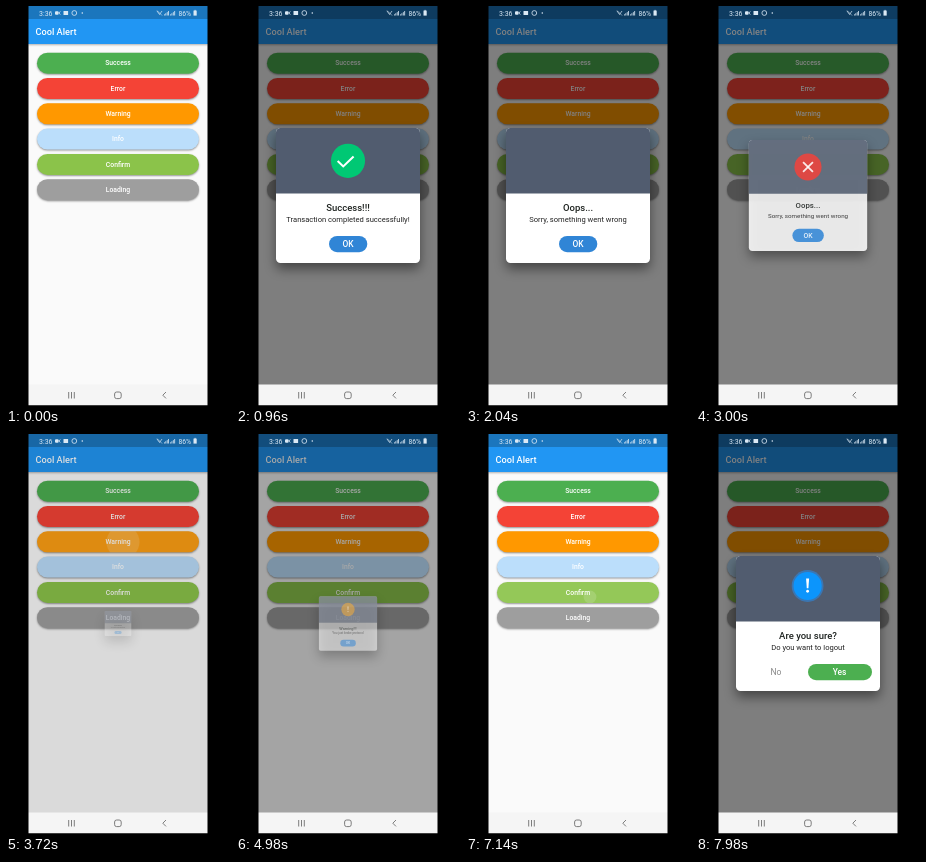
An HTML page with a canvas that plays this animation: 224x400 px, repeating every 8 s.

```html
<!DOCTYPE html>
<html lang="en">
<head>
<meta charset="utf-8">
<title>Cool Alert</title>
<style>
html, body { margin: 0; width: 100%; height: 100%; overflow: hidden; background: #000; }
canvas { display: block; width: 224px; height: 400px; }
</style>
</head>
<body>
<canvas id="stage"></canvas>
<script>
const W = 224, H = 400, LOOP = 8000, MOVE = 146;
const canvas = document.getElementById('stage');
const c = canvas.getContext('2d');
const dpr = Math.max(1, window.devicePixelRatio || 1);
canvas.width = W * dpr;
canvas.height = H * dpr;

const FONT = 'Roboto, Arial, sans-serif';
const buttons = [
  ['Success', '#4caf50'], ['Error', '#f44336'], ['Warning', '#ff9800'],
  ['Info', '#bbdefb'], ['Confirm', '#8bc34a'], ['Loading', '#9e9e9e']
];
const alerts = [
  { button: 0, tap: 55, open: 95, icon: 400, close: 1115, x: 118, y: 60,
    title: 'Success!!!', text: 'Transaction completed successfully!', color: '#00c874', mark: 'check' },
  { button: 1, tap: 1555, open: 1595, icon: 2045, close: 2975, x: 118, y: 85,
    title: 'Oops...', text: 'Sorry, something went wrong', color: '#f0433c', mark: 'cross' },
  { button: 2, tap: 3664, open: 3694, icon: 4010, close: 4894, x: 117, y: 108,
    title: 'Warning!!!', text: 'You just broke protocol', color: '#fbb034', mark: 'bang' },
  { button: 3, tap: 5455, open: 5495, icon: 5850, close: 6695, x: 120, y: 136,
    title: 'Info!', text: 'Buy two, get one free', color: '#0c95fc', mark: 'bang', glow: true },
  { button: 4, tap: 7130, open: 7180, icon: 7520, close: 9000, x: 124, y: 163,
    title: 'Are you sure?', text: 'Do you want to logout', color: '#0c95fc', mark: 'bang', glow: true, ask: true }
];

const clamp = v => Math.max(0, Math.min(1, v));
const part = (t, from, length) => clamp((t - from) / length);
const outBack = v => 1 + 2.4 * (v - 1) ** 3 + 1.4 * (v - 1) ** 2;

// cubic-bezier(.25, .1, .25, 1)
function ease(x) {
  let lo = 0, hi = 1, s = x;
  for (let i = 0; i < 16; i++) {
    s = (lo + hi) / 2;
    const bx = .75 * s * (1 - s) + s ** 3;
    if (bx < x) lo = s; else hi = s;
  }
  return .3 * s * (1 - s) ** 2 + 3 * s * s * (1 - s) + s ** 3;
}

function rect(x, y, w, h, color) {
  c.fillStyle = color;
  c.fillRect(x, y, w, h);
}

function roundPath(x, y, w, h, r) {
  c.beginPath();
  c.roundRect(x, y, w, h, r);
}

function pill(x, y, w, h, color) {
  roundPath(x, y, w, h, h / 2);
  c.fillStyle = color;
  c.fill();
}

function disc(x, y, r, color) {
  c.beginPath();
  c.arc(x, y, r, 0, Math.PI * 2);
  c.fillStyle = color;
  c.fill();
}

function line(points, width, color) {
  c.beginPath();
  points.forEach(([x, y], i) => i ? c.lineTo(x, y) : c.moveTo(x, y));
  c.strokeStyle = color;
  c.lineWidth = width;
  c.stroke();
}

function label(str, x, y, size, weight, color, align = 'center') {
  c.font = `${weight} ${size}px ${FONT}`;
  c.textAlign = align;
  c.fillStyle = color;
  c.fillText(str, x, y);
}

function shadow(color, blur, dy) {
  c.shadowColor = color;
  c.shadowBlur = blur * dpr;
  c.shadowOffsetY = dy * dpr;
}

const black = a => `rgba(0,0,0,${a})`;

function statusIcons() {
  const ink = '#dbe9f5';
  label('3:36', 33, 9.6, 7, 400, ink, 'left');
  roundPath(49, 5.2, 3.6, 3.6, 1);
  c.fillStyle = ink;
  c.fill();
  line([[54.3, 5.4], [53, 7], [54.3, 8.6]], .8, ink);
  rect(57.5, 5, 4.6, 4, ink);
  c.beginPath();
  c.arc(68.3, 7, 2.4, 0, Math.PI * 2);
  c.lineWidth = .8;
  c.stroke();
  disc(76.3, 7, .8, ink);
  line([[151, 5], [153.5, 8.5], [156, 5]], .7, ink);
  line([[151, 4.5], [156, 9.5]], .6, ink);
  for (let i = 0; i < 8; i++) {
    const h = 1.2 + (i % 4) * 1.1;
    rect(158 + i * 1.4 + (i > 3 ? .5 : 0), 9.5 - h, .8, h, ink);
  }
  label('86%', 172.4, 9.6, 6.8, 400, ink, 'left');
  rect(187.5, 4.6, 3.2, 5, ink);
  rect(188.4, 3.9, 1.4, .8, ink);
}

function navBar() {
  const ink = '#707070';
  rect(22, 378.5, 180, 21, '#f5f5f5');
  for (let i = 0; i < 3; i++) line([[62.7 + i * 2.8, 386], [62.7 + i * 2.8, 392.5]], .9, ink);
  roundPath(108.6, 386, 6.6, 6.6, 2);
  c.lineWidth = .9;
  c.strokeStyle = ink;
  c.stroke();
  line([[160, 386], [156.8, 389.2], [160, 392.4]], .9, ink);
}

function ripple(a, t) {
  const dt = t - a.tap;
  if (dt < 0 || dt > 220) return;
  c.save();
  c.clip();
  const fade = 1 - part(dt, 90, 130);
  rect(31, 40, 162, 160, `rgba(255,255,255,${.08 * fade})`);
  disc(a.x, a.y, 4 + dt * .22, `rgba(255,255,255,${.15 * fade})`);
  c.restore();
}

function screen(t, dim) {
  rect(22, 0, 180, 379, '#fafafa');
  c.save();
  shadow(black(.3), 2, .8);
  rect(22, 13, 180, 25, '#2196f3');
  c.restore();
  rect(22, 0, 180, 13, '#1b76bd');
  label('Cool Alert', 29.5, 28.7, 9.2, 500, '#fff', 'left');
  buttons.forEach(([name, color], i) => {
    const y = 46.7 + i * 25.3;
    c.save();
    shadow(black(.4), 2, 1);
    pill(31, y, 162, 21, color);
    c.restore();
    alerts.forEach(a => { if (a.button === i) ripple(a, t); });
    label(name, 112, y + 12.6, 6.8, 500, '#fff');
  });
  rect(22, 0, 180, 379, black(dim));
  statusIcons();
  navBar();
}

// Black margins around the phone
function frame() {
  rect(0, 0, 22.5, H, '#000');
  rect(201.5, 0, 22.5, H, '#000');
  rect(0, 399.5, W, .5, '#000');
}

function icon(a, t) {
  const dt = t - a.icon;
  if (dt <= 0) return;
  const grow = Math.max(.05, outBack(part(dt, 0, 320)));
  const draw = part(dt, 180, 260);
  const pulse = Math.sin(part(dt, 440, 350) * Math.PI);
  c.save();
  if (a.glow) c.translate(111.6, 152); else c.translate(112, 154.8);
  c.scale(grow * (1 + pulse * .04), grow * (1 + pulse * .04));
  if (a.glow) disc(0, 0, 15.6 + pulse, 'rgba(40,140,235,.55)');
  disc(0, 0, a.glow ? 14 : 16.5, a.color);
  if (a.mark === 'check') {
    const p = [[-10, .2], [-4.6, 5.4], [5.4, -4.2]];
    const first = clamp(draw / .38), second = clamp((draw - .38) / .62);
    const mix = (u, v, k) => [u[0] + (v[0] - u[0]) * k, u[1] + (v[1] - u[1]) * k];
    if (draw > 0) {
      const pts = [p[0], mix(p[0], p[1], first)];
      if (second > 0) pts.push(mix(p[1], p[2], second));
      line(pts, 2, '#fff');
    }
  } else if (a.mark === 'cross') {
    const r = 6 * draw;
    line([[-r, -r], [r, r]], 2.2, '#fff');
    line([[r, -r], [-r, r]], 2.2, '#fff');
  } else if (draw > 0) {
    c.scale(draw, draw);
    c.beginPath();
    c.moveTo(-1.5, -7.5);
    c.lineTo(1.5, -7.5);
    c.lineTo(.8, 2.2);
    c.lineTo(-.8, 2.2);
    c.fillStyle = '#fff';
    c.fill();
    disc(0, 5.2, 1.4, '#fff');
  }
  c.restore();
}

function dialog(a, t, v) {
  c.save();
  c.translate(112, 189.5);
  c.scale(v, v);
  c.translate(-112, -189.5);
  c.globalAlpha = v ** .7;
  c.save();
  shadow(black(.45), 12, 6);
  roundPath(40, 122, 144, 135, 4.5);
  c.fillStyle = '#fff';
  c.fill();
  c.restore();
  roundPath(40, 122, 144, 65.5, [4.5, 4.5, 0, 0]);
  c.fillStyle = '#515c6f';
  c.fill();
  icon(a, t);
  label(a.title, 112, 205, 9.5, 500, '#1f2421');
  label(a.text, 112, 216.3, 7.58, 400, '#222');
  if (a.ask) {
    label('No', 80, 241.2, 8.6, 400, '#8a8a8a');
    pill(112, 230, 64, 16.2, '#4caf50');
    label('Yes', 143.5, 241.1, 8.4, 500, '#fff');
  } else {
    pill(93, 230, 38.3, 16.2, '#3085d6');
    label('OK', 112, 241.1, 8.4, 500, '#fff');
  }
  c.restore();
}

function render(t) {
  c.setTransform(dpr, 0, 0, dpr, 0, 0);
  rect(0, 0, W, H, '#000');
  let current = null, v = 0;
  for (const a of alerts) {
    const k = part(t, a.open, MOVE) - part(t, a.close, MOVE);
    if (k > .01) { current = a; v = k; }
  }
  screen(t, .5 * ease(v));
  if (current) dialog(current, t, v);
  frame();
}

const start = performance.now();
function tick() {
  render((performance.now() - start) % LOOP);
  requestAnimationFrame(tick);
}
tick();
</script>
</body>
</html>
```
